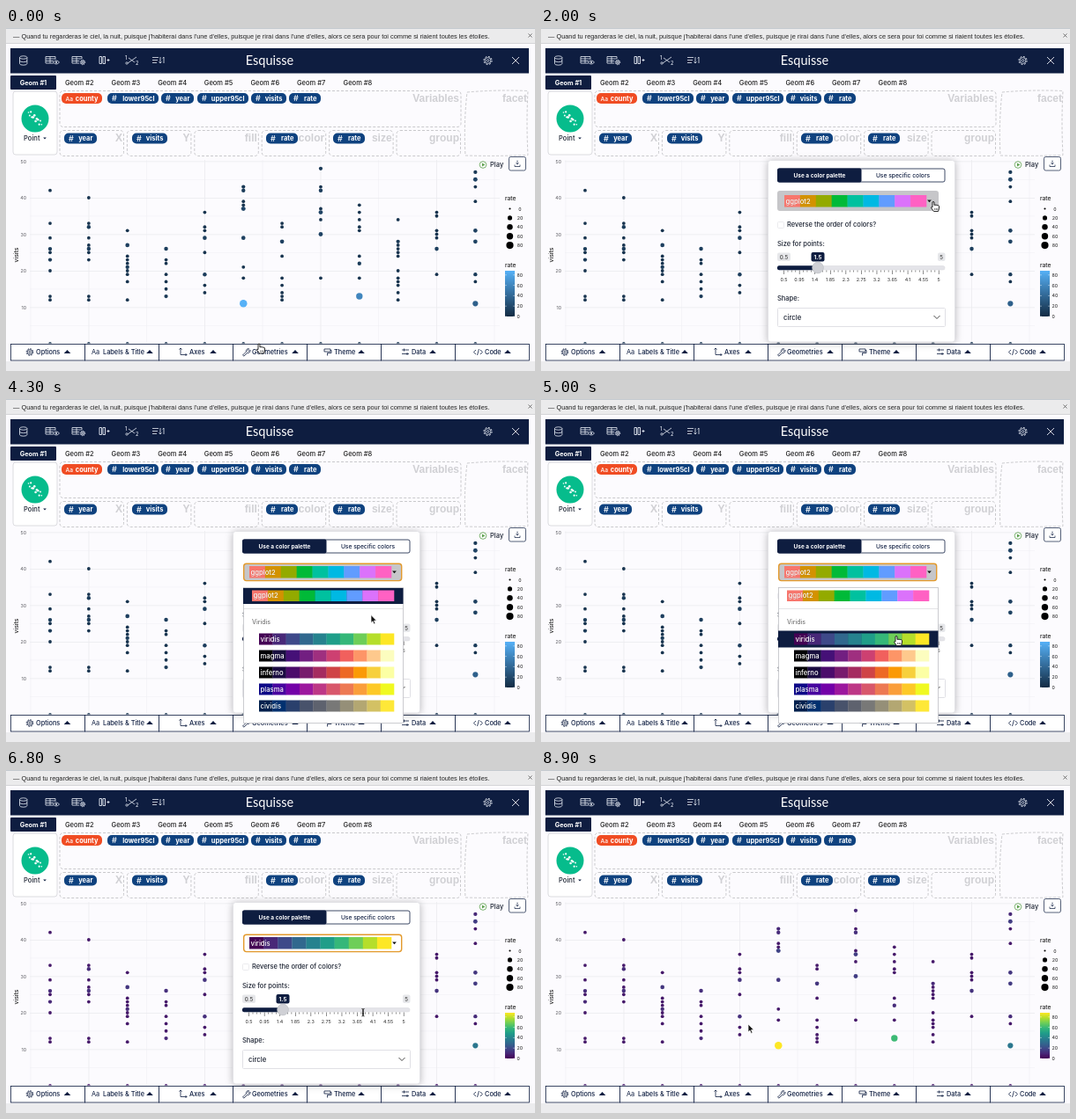
Write an HTML page that moves like this. It is 600 px wide and 390 px high and loops after 9000 ms.

```html
<!DOCTYPE html>
<html lang="fr">
<head>
<meta charset="utf-8">
<title>Esquisse</title>
<style>
html, body { margin: 0; width: 100%; height: 100%; overflow: hidden; background: #fcfbfe; }
svg { display: block; width: 100vw; height: 100vh; }
text { font-family: Inter, "Open Sans", sans-serif; font-weight: 500; white-space: pre; }
.bold { font-weight: 700; }
.plain { font-weight: 400; }
.zone { font-family: "Liberation Sans", Arial, sans-serif; font-weight: 700; }
.quote { font-family: "Liberation Sans", Arial, sans-serif; font-weight: 400; }
.title { font-family: Lato, sans-serif; font-weight: 400; }
</style>
</head>
<body>
<svg id="stage" viewBox="0 0 600 390"></svg>
<script>
const NAVY = '#0e1d40', BLUE = '#0f427f', INK = '#1d2433';
const LOOP = 9000;

const palettes = {
  ggplot2: 'F8766D D39200 93AA00 00BA38 00C19F 00B9E3 619CFF DB72FB FF61C3',
  viridis: '440154 482878 3e4989 31688e 26828e 1f9e89 35b779 6ece58 b5de2b fde725',
  magma: '000004 180f3e 451077 721f81 9f2f7f cd4071 f1605d fd9567 fec98d fcfdbf',
  inferno: '000004 1b0c42 4b0c6b 781c6d a52c60 cf4446 ed6925 fb9a06 f7d03c fcffa4',
  plasma: '0d0887 47039f 7301a8 9c179e bd3786 d8576b ed7953 fa9e3b fdc926 f0f921',
  cividis: '00204d 00306f 2a406c 48526b 5e626e 787877 958f78 b3a772 d3c164 fee838',
  blues: '132b43 56b1f7'
};
const colours = name => palettes[name].split(' ').map(c => '#' + c);

// Drawing helpers that return SVG markup
const rect = (x, y, w, h, fill, more = '') =>
  `<rect x="${x}" y="${y}" width="${w}" height="${h}" fill="${fill}" ${more}/>`;
const dot = (x, y, r, fill, more = '') => `<circle cx="${x}" cy="${y}" r="${r}" fill="${fill}" ${more}/>`;
const stroke = (d, colour, width = 1, more = '') =>
  `<path d="${d}" fill="none" stroke="${colour}" stroke-width="${width}" ${more}/>`;
const fillPath = (d, colour, more = '') => `<path d="${d}" fill="${colour}" ${more}/>`;
const text = (x, y, s, size, fill = INK, more = '') =>
  `<text x="${x}" y="${y}" font-size="${size}" fill="${fill}" ${more}>${s}</text>`;
const group = (id, body) => `<g id="${id}">${body}</g>`;
const middle = 'text-anchor="middle" ', end = 'text-anchor="end" ', bold = 'class="bold" ', plain = 'class="plain" ';
const caret = (x, y, w, h, colour = NAVY) => fillPath(`M${x - w} ${y}h${2 * w}l${-w} ${h}z`, colour);

function gear(x, y, r, colour) {
  return dot(x, y, r * .75, 'none', `stroke="${colour}" stroke-width=".8"`) +
    dot(x, y, r * .3, 'none', `stroke="${colour}" stroke-width=".7"`) +
    dot(x, y, r, 'none', `stroke="${colour}" stroke-width="1" stroke-dasharray="${r * .39} ${r * .395}"`);
}

function header() {
  const W = '#e8ecf5';
  const table = x => stroke(`M${x - 7} 32.5h11v7.5h-11zM${x - 7} 35h11M${x - 7} 37.5h11M${x - 2} 32.5v7.5`, W, .8);
  const quote = "— Quand tu regarderas le ciel, la nuit, puisque j'habiterai dans l'une d'elles, " +
    "puisque je rirai dans l'une d'elles, alors ce sera pour toi comme si riaient toutes les étoiles.";
  return rect(0, 0, 600, 17, '#ebebec') + rect(0, 0, 600, 1, '#c3c8ce') + rect(0, 17, 600, 1, '#d5d5d7') +
    text(8, 11.5, quote, 7.37, '#222', 'class="quote"') +
    stroke('M592.5 6.5l4 4m0-4l-4 4', '#555', .8) +
    rect(5, 23, 588, 28.5, NAVY) +
    stroke('M15.5 33.5a4.2 1.7 0 0 1 8.4 0v7a4.2 1.7 0 0 1-8.4 0zm0 0a4.2 1.7 0 0 0 8.4 0m-8.4 3.5a4.2 1.7 0 0 0 8.4 0', W, .8) +
    table(52) + dot(57, 39, 3.4, NAVY) + stroke('M53.5 39q3.5-4 7 0q-3.5 4-7 0z', W, .8) + dot(57, 39, 1, W) +
    table(82) + dot(87, 39, 4, NAVY) + gear(87, 39, 2.7, W) +
    stroke('M106 32.5h2.5v8h-2.5zM110 32.5h2.5v8h-2.5zM114.5 36.5h3m-1.5-1.5v3', W, .9) +
    text(135, 36, '1', 5.5, W) + text(147, 42, '2', 5.5, W) +
    stroke('M138 40l10-7M139 34l7 5', W, .8) + dot(137, 40, 1.2, 'none', `stroke="${W}" stroke-width=".7"`) +
    stroke('M166 33.5h7M166 36.5h6M166 39.5h5M175 33v7l-1.5-1.5m1.5 1.5l1.5-1.5M179 40v-7l-1.2 1.5', W, .8) +
    text(299, 41.5, 'Esquisse', 14.5, '#fff', middle + 'class="title"') +
    gear(546.5, 37, 4.6, W) + stroke('M574 33l8 8m0-8l-8 8', W, .9);
}

function tabs() {
  let out = rect(5, 54, 52, 16, NAVY, 'rx="1"') + text(31, 65, 'Geom #1', 7.3, '#fff', middle + bold);
  for (let i = 2; i < 9; i++) out += text(67 + (i - 2) * 52.6, 65, 'Geom #' + i, 7.5, '#222');
  return out;
}

function pill(x, y, w, name, colour = BLUE) {
  const icon = colour === BLUE ? text(x + 5, y + 9.2, '#', 9, '#fff') : text(x + 4.5, y + 8.6, 'Aa', 6.6, '#fff');
  return rect(x, y, w, 12, colour, 'rx="5"') + icon + text(x + w - 4.5, y + 8.5, name, 7.5, '#fff', end + bold);
}

function zones() {
  const dash = 'stroke="#c9c9cc" stroke-width="1" stroke-dasharray="3 2" rx="4"';
  const label = (x, y, s) => text(x, y, s, 12, '#d0d0d4', end + 'class="zone"');
  let out = rect(8, 72, 50, 72, '#fff', 'rx="3" stroke="#dcdce0"') + dot(33, 103, 15.5, '#06bc8c');
  for (let i = 0; i < 12; i++) {
    out += dot(25.5 + i * 1.35, 96 + i * 1.2 + 3 * Math.sin(i * 2.3), .8 + .5 * Math.sin(i / 11 * Math.PI), '#fff');
  }
  out += text(20, 128, 'Point', 7.6) + caret(44, 124.5, 1.8, 2) +
    rect(61, 71.5, 455, 41, 'none', dash) + label(514, 84, 'Variables') +
    stroke('M523 73Q556 70 592 71.5Q590 108 592 144.5Q556 146 521 145Q519 108 523 73z', '#c9c9cc', 1, 'stroke-dasharray="3 2"') +
    label(591, 84, 'facet');
  ['X', 'Y', 'fill', 'color', 'size', 'group'].forEach((s, i) => {
    const x = 61 + i * 76.4;
    out += rect(x, 116.5, 72.5, 29, 'none', dash) + label(x + 71, 129, s);
  });
  out += pill(63, 74, 46, 'county', '#f04c23');
  [[115, 58, 'lower95cl'], [176, 37, 'year'], [217, 58, 'upper95cl'], [278, 40, 'visits'], [321, 36, 'rate']]
    .forEach(([x, w, s]) => out += pill(x, 74, w, s));
  [[66, 37, 'year'], [143, 40, 'visits'], [295, 36, 'rate'], [371, 36, 'rate']]
    .forEach(([x, w, s]) => out += pill(x, 119.5, w, s));
  return out;
}

// Visits per year; a suffix such as 11:88 gives a rate other than the default
const visits = [
  '42 33 29 26:11 25 23:10 20 13 12', '40 33 32:11 29 27 26:12 25 23 13 12',
  '31 27:14 24 23 22 21:11 20 19 17 12', '26:12 23 22 19 17 15 13:10',
  '36 32 31 29:13 25 19:12 16 14', '43:10 42:11 39 38 37:18 29:14 21 18 11:88',
  '33 32 28:14 24 18 16 14 13 12', '48:10 43 42:12 37 36:16 34 30:16 18',
  '38 36 34 32 31 24 22:11 18 13:60', '34 28:10 27 26 25 24 20 18 17 16 14 12',
  '36 35 31 30 29 26:13 19', '47:10 45:16 43 39 31:14 28:15 19:11 17 11:35'
];
const yOf = v => 359 - v * 4.15;
const radius = rate => 1.05 + 3.2 * Math.sqrt(rate / 88);

function ramp(list, u) {
  const p = u * (list.length - 1), i = Math.min(Math.floor(p), list.length - 2);
  const [a, b] = [list[i], list[i + 1]].map(c => [1, 3, 5].map(k => parseInt(c.slice(k, k + 2), 16)));
  return `rgb(${a.map((v, k) => Math.round(v + (b[k] - v) * (p - i)))})`;
}

function chartBase() {
  let out = '';
  for (let v = 5; v <= 50; v += 5) out += rect(27, yOf(v), 533, v % 10 ? .4 : .8, '#ebebef');
  for (let i = 0; i < 9; i++) out += rect(27.8 + i * 65.75, 150, i % 2 ? .8 : .4, 209, '#ebebef');
  for (let v = 10; v <= 50; v += 10) out += text(23, yOf(v) + 2, v, 5.2, '#6b6b70', end);
  out += text(0, 0, 'visits', 6.8, '#222', middle + 'transform="translate(14 258) rotate(-90)"');
  out += text(566, 196, 'rate', 6.7, '#222');
  [0, 20, 40, 60, 80].forEach((r, i) => {
    out += dot(571.5, 205.5 + i * 10.4, radius(r), '#000') + text(583, 207.5 + i * 10.4, r, 5.2, '#333', middle) +
      text(579.5, 330 - i * 11.8, r, 5.2, '#333');
  });
  out += text(566, 272, 'rate', 6.7, '#222');
  return out + dot(541, 155.5, 3.8, '#fff', 'stroke="#5a9e4b" stroke-width=".8"') +
    fillPath('M540 153.5l3.3 2l-3.3 2z', '#5a9e4b') +
    text(549, 158, 'Play', 7.6) + rect(570.5, 146.5, 19, 15.5, '#fff', `rx="2" stroke="${NAVY}" stroke-width=".7"`) +
    stroke('M580 150.5v4.5m-1.5-1.5l1.5 1.5l1.5-1.5M577 155.5v2h6v-2', NAVY, .7);
}

function points(id, name) {
  const list = colours(name);
  const stops = list.map((c, i) => `<stop offset="${i / (list.length - 1)}" stop-color="${c}"/>`).join('');
  let out = `<linearGradient id="${name}Ramp" x1="0" y1="1" x2="0" y2="0">${stops}</linearGradient>` +
    rect(566, 276, 11, 52, `url(#${name}Ramp)`);
  for (let i = 0; i < 5; i++) out += stroke(`M566 ${328 - i * 11.8}h2m7 0h2`, '#fff', .4);
  visits.forEach((year, i) => (year + ' 0').split(' ').forEach(item => {
    const [v, rate = 6] = item.split(':').map(Number);
    out += dot(50 + i * 43.85, yOf(v), radius(rate), ramp(list, rate / 88));
  }));
  return group(id, out);
}

function footer() {
  const items = [['Options', 34], ['Labels &amp; Title', 110], ['Axes', 208], ['Geometries', 279],
    ['Theme', 372], ['Data', 460], ['Code', 543]];
  const carets = [69.5, 163, 235, 328, 403, 484, 569];
  let out = rect(0, 358.5, 600, 31.5, '#fcfbfe') + rect(0, 379, 600, 11, '#ececee');
  items.forEach(([s, x], i) => {
    out += rect(5.5 + i * 84, 359.5, 84, 18.5, '#fff', `stroke="${NAVY}" stroke-width=".8"`) +
      text(x, 371.2, s, 7.35, NAVY) + caret(carets[i], 370, 3.8, -4);
  });
  return out + gear(27, 368.5, 3.8, NAVY) + text(97, 371.2, 'Aa', 7.35, NAVY, plain) +
    stroke('M198 364v7.5h7m-8.5-6l1.5-1.5l1.5 1.5m4 4.5l1.5 1.5l-1.5 1.5', NAVY, .8) +
    stroke('M268.5 372l4-4a2.5 2.5 0 0 1 3.2-3.2l-1.5 1.6l1.2 1.2l1.5-1.5a2.5 2.5 0 0 1-3.2 3.2l-3.8 3.8z', NAVY, .8) +
    stroke('M361 365h7v3h-7zM368 366.5h1v3h-4.5v3', NAVY, .8) +
    stroke('M449 366h8M449 370.5h8M451.5 364.5v3M455 369v3', NAVY, .8) +
    stroke('M533 366l-2.5 2.5l2.5 2.5M538 366l2.5 2.5l-2.5 2.5M536.5 365l-2 7', NAVY, .8);
}

function swatches(x, y, w, h, name) {
  const list = colours(name), step = w / list.length;
  return list.map((c, i) => rect(x + i * step, y, step + .3, h, c)).join('') +
    text(x + 1.5, y + h - 3.8, name, 7.7, '#fff', 'style="text-shadow:0 0 1px #0004"');
}

function popover() {
  let out = rect(257.5, 150.5, 212, 206.5, '#fff', 'rx="3" stroke="#e2e2e6" style="filter:drop-shadow(0 1px 4px #0004)"') +
    rect(268.5, 160, 189.5, 15, '#fff', `rx="2" stroke="${NAVY}" stroke-width=".8"`) +
    rect(268, 159.6, 95.5, 15.8, NAVY, 'rx="2"') +
    text(316, 170, 'Use a color palette', 6.5, '#fff', middle + bold) +
    text(410.5, 170, 'Use specific colors', 6.7, NAVY, middle) +
    rect(268, 185, 183, 23, '#fff', 'id="field" rx="3"') +
    group('pickDefault', swatches(276, 190, 161, 13.5, 'ggplot2')) +
    group('pickViridis', swatches(276, 190, 161, 13.5, 'viridis')) + caret(440.5, 195.5, 2.4, 2.8, '#111') +
    rect(268.5, 220.5, 7, 7, '#fff', 'rx="1" stroke="#e6e6ea" stroke-width=".8"') +
    text(279, 226.3, 'Reverse the order of colors?', 7.5) + text(268, 247.5, 'Size for points:', 7.5) +
    rect(268, 255.5, 15, 9.5, '#e6e7ea', 'rx="2"') + text(275.5, 262.5, '0.5', 6.2, '#444', middle) +
    rect(450, 255.5, 8.5, 9.5, '#e6e7ea', 'rx="2"') + text(454.2, 262.5, '5', 6.2, '#444', middle) +
    rect(306.5, 255, 15, 10.5, NAVY, 'rx="2"') + text(314, 262.6, '1.5', 6.4, '#fff', middle + bold) +
    rect(268.5, 270.5, 189.5, 4.5, '#e4e4e9', 'rx="2" stroke="#d6d6db" stroke-width=".5"') +
    rect(268, 270.3, 46, 4.9, NAVY, 'rx="2"');
  for (let i = 0; i <= 40; i++) out += rect(275.3 + i * 4.39, 275.5, .6, i % 4 ? 2 : 4.5, '#444');
  for (let i = 0; i <= 10; i++) out += text(275.5 + i * 17.56, 287.8, +(.5 + i * .45).toFixed(2), 5.3, '#444', middle);
  return out + dot(314, 272.5, 6.4, '#cfd0d5', 'stroke="#b8bac0" stroke-width=".6"') +
    text(268, 310, 'Shape:', 7.5) + rect(268.5, 318.5, 190, 21, '#fff', 'rx="1" stroke="#dddde2" stroke-width=".9"') +
    text(275, 331.6, 'circle', 7.8) + stroke('M445.5 327l3.5 3.5l3.5-3.5', '#333', .9);
}

function dropdown() {
  let out = rect(269.5, 214.5, 181, 154, '#fff', 'stroke="#bfc0c5" stroke-width=".8"') +
    rect(269, 215, 181.5, 18, NAVY, 'id="active"') + swatches(279, 217.5, 161, 12.5, 'ggplot2') +
    rect(270, 238, 180, .7, '#d8d8dc') + text(279, 255.5, 'Viridis', 7, '#777');
  ['viridis', 'magma', 'inferno', 'plasma', 'cividis'].forEach((s, i) => out += swatches(287, 266.5 + i * 19, 153, 13, s));
  return out;
}

const cursors = {
  arrow: fillPath('M-2.5-4.5v9l2-1.8l1.4 3.2l1.5-.7l-1.4-3.1h2.8z', '#111', 'stroke="#fff" stroke-width=".7"'),
  hand: fillPath('M-3-5q1-1 2 0v3.5q1-1 2 0q1-.8 1.8.3q1.4-.5 1.7.7v3l-1 3h-5l-3-4q0-1.500 1.5-.5z', '#fff',
    'stroke="#111" stroke-width=".9"') + stroke('M-.3 2v2M1.3 2v2M2.9 2v2', '#111', .6),
  beam: stroke('M-1.5-4q1.5 0 1.5 1v6.5q0 1-1.5 1M1.5-4q-1.5 0-1.5 1v6.5q0 1 1.5 1M-1 1.5h2', '#111', .9)
};

const $ = id => document.getElementById(id);
$('stage').innerHTML = rect(0, 0, 600, 390, '#fcfbfe') + header() + tabs() + zones() + chartBase() +
  points('before', 'blues') + points('after', 'viridis') + footer() +
  group('popover', popover()) + group('dropdown', dropdown()) +
  group('cursor', Object.keys(cursors).map(k => group(k, cursors[k])).join(''));

// Moments of the interaction, in ms
const OPEN = 900, FOCUS = 3000, LIST = 3400, PICK = 5200, REDRAW = 6300, CLOSE = 8200;

// Pointer stops: time, x, y
const route = [[0, 289, 364.5], [1000, 289, 364.5], [1900, 447, 203], [LIST, 446, 201],
  [4300, 416.5, 250], [5000, 405, 275], [7000, 405, 275.5], [8000, 237.5, 293.5], [LOOP, 237.5, 293.5]];

function pointer(t) {
  const i = route.findIndex(p => p[0] > t), a = route[i - 1], b = route[i];
  const u = (t - a[0]) / (b[0] - a[0]), e = u * u * (3 - 2 * u);
  return [a[1] + (b[1] - a[1]) * e, a[2] + (b[2] - a[2]) * e];
}

function cursorKind(t, x, y) {
  if (t >= PICK) return t < CLOSE && x > 400 ? 'beam' : 'arrow';
  const onButton = y > 359, onField = y < 208, onItem = t > LIST && y > 264;
  return onButton || onField || onItem ? 'hand' : 'arrow';
}

const show = (id, on) => $(id).setAttribute('display', on ? 'inline' : 'none');
const set = (id, attrs) => Object.entries(attrs).forEach(([k, v]) => $(id).setAttribute(k, v));

function draw(now) {
  const t = Math.floor(now % LOOP / 100) * 100;
  const [x, y] = pointer(t);
  const picked = t >= PICK, focused = t >= FOCUS;
  show('before', t < REDRAW);
  show('after', t >= REDRAW);
  show('popover', t >= OPEN && t < CLOSE);
  show('dropdown', t >= LIST && !picked);
  show('pickDefault', !picked);
  show('pickViridis', picked);
  set('field', {
    x: focused ? 269.7 : 268, y: focused ? 187.2 : 185,
    width: focused ? 179 : 183, height: focused ? 19.4 : 23,
    fill: picked ? (t < PICK + 500 ? '#e2e2e5' : '#fff') : y < 208 || focused ? '#c6c6c9' : '#f3f3f5',
    stroke: focused ? '#e39a2c' : 'none', 'stroke-width': 1.4
  });
  const low = y > 262;
  set('active', { y: low ? 263.5 : 215, height: low ? 19 : 18 });
  const kind = cursorKind(t, x, y);
  Object.keys(cursors).forEach(k => show(k, k === kind));
  set('cursor', { transform: `translate(${x} ${y})` });
}

const start = performance.now();
function tick() {
  draw(performance.now() - start);
  requestAnimationFrame(tick);
}
draw(0);
requestAnimationFrame(tick);
</script>
</body>
</html>
```
